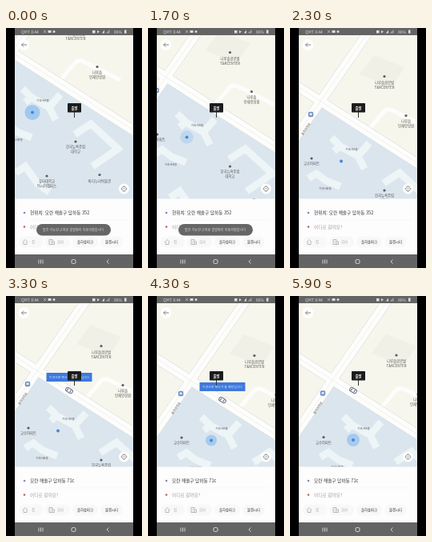
An HTML page for the animation above (6000 ms loop, 170 px wide and 300 px high).

```html
<!DOCTYPE html>
<html lang="ko">
<meta charset="utf-8">
<style>
  html, body { margin: 0; height: 100%; overflow: hidden; background: #000; }
  svg { display: block; width: 170px; height: 300px; }
  text { font-family: "Noto Sans CJK KR", "Noto Sans CJK", sans-serif; font-size: 4.4px; fill: #555; }
  .mid { text-anchor: middle; }
  .status text { font-size: 5px; fill: #ddd; }
  .row { font-size: 5.65px; fill: #333; }
  .line { fill: none; stroke: #ccc; stroke-width: .8; }
</style>
<svg viewBox="0 0 170 300">
  <defs>
    <clipPath id="view"><path d="M11 9H159V214H11z"/></clipPath>
    <path id="roads" d="M-121 -9L329 279M-123 328L177 -106"/>
  </defs>

  <path d="M11 0H159V300H11z" fill="#646464"/>
  <g clip-path="url(#view)">
    <path d="M11 9H159V214H11z" fill="#f6f6ed"/>
    <g id="map">
      <path d="M37 96L320 277V420H-200z" fill="#dbe5ee"/>
      <path d="M88 60L106 36 144 51 128 76z" fill="#f1f0e6"/>
      <path d="M101 127L118 107Q122 102 129 105L175 128" fill="none" stroke="#fdfdfc" stroke-width="5"/>
      <use href="#roads" fill="none" stroke="#dcdedd" stroke-width="12.5"/>
      <use href="#roads" fill="none" stroke="#fdfdfc" stroke-width="11.3"/>
      <use href="#roads" fill="none" stroke="#ecebe3" stroke-width=".7"/>
      <g fill="none" stroke="#eef5f7" stroke-width="9">
        <path d="M53 139L64 150 86 162 100 146M86 162L94 178M64 149L56 156"/>
        <path d="M24 190L34 184 46 193 64 200"/>
        <path d="M118 196L138 183 172 214 140 236"/>
        <path d="M44 244L56 236 72 258 86 268"/>
      </g>
      <g id="places" class="mid"></g>
      <text class="mid" transform="translate(22 129) rotate(-55)" style="font-size:3.8px">솔하과학로</text>
      <g transform="translate(27 110)">
        <rect x="-3.2" y="-3.2" width="6.4" height="6.4" rx="2" fill="#6f8fc4"/>
        <path d="M-1.6 -1.6H1.6V1.2H-1.6z" fill="#dfe8f5"/>
      </g>
      <circle id="halo" cx="65" cy="168.5" fill="#6fb2f0"/>
      <circle cx="65" cy="168.5" r="2" fill="#4a86d8"/>
      <g id="bubble">
        <rect x="50.5" y="96" width="57" height="11" fill="#3f78dc"/>
        <text class="mid" x="79" y="103" style="font-size:3.9px;fill:#e4eeff">이곳으로 택시가 올 예정입니다</text>
      </g>
    </g>
    <g id="car">
      <rect x="-4.5" y="-2.6" width="9" height="5.2" rx="2.2" fill="#f7f9fc" stroke="#56617a" stroke-width=".9"/>
      <path d="M-2.2 -1.7V1.7M1.8 -1.7V1.7" stroke="#56617a"/>
    </g>
    <path d="M85.5 105V112" stroke="#333"/>
    <rect x="77" y="94" width="17" height="11.5" rx=".8" fill="#1c1c1c"/>
    <text class="mid" x="85.5" y="101.6" style="fill:#fff;font-weight:700">출발</text>
    <circle cx="22.5" cy="21" r="7" fill="#fff" opacity=".85"/>
    <path d="M26 21H19.5M22 18.5L19.5 21 22 23.5" class="line" style="stroke:#666"/>
    <circle cx="147.5" cy="201" r="6.5" fill="#fff"/>
    <g class="line" style="stroke:#888">
      <circle cx="147.5" cy="201" r="2.8"/>
      <path d="M147.5 197V198.5M147.5 203.5V205M143.5 201H145M150 201H151.5"/>
    </g>
    <circle cx="147.5" cy="201" r=".8" fill="#888"/>
  </g>

  <path d="M11 213.5H159V283H11z" fill="#fdfdfd"/>
  <circle cx="23" cy="231" r="1.3" fill="#7f88ba"/>
  <text id="address" class="row" x="30" y="233.2"></text>
  <path d="M30 240H152" stroke="#f3f3f3" stroke-width=".6"/>
  <circle cx="23" cy="248.5" r="1.3" fill="#c06078"/>
  <text class="row" x="30" y="250.7" style="fill:#aa9a9d">어디로 갈까요?</text>
  <g id="chips"></g>
  <g class="line" style="stroke:#aaa">
    <path d="M21 267.5L24 264.5 27 267.5M22 267V270.5H26V267"/>
    <path d="M54 270.5V264.5H58V270.5zM58 267H60.5V270.5H58M55.5 266.5H56.5M55.5 268.5H56.5"/>
  </g>
  <g id="toast">
    <rect x="38" y="245" width="93" height="14.5" rx="7.2" fill="#666"/>
    <text class="mid" x="84" y="253.7" style="font-size:4.1px;fill:#ddd">탑승 가능한 근처로 출발점이 이동하였습니다</text>
  </g>

  <g class="status">
    <text x="19" y="6.6">QMT 8:44</text>
    <path d="M47 3L50 6M50 3L47 6" class="line"/>
    <path d="M52.5 3H56.5V6H52.5zM108 3H111.5V6.5H108zM114 3L117 4.7 114 6.5zM120 6.5L123 2.5V6.5zM148 2.5H150.5V6.8H148z" fill="#ddd"/>
    <circle cx="60" cy="4.6" r="1.5" fill="#ddd"/>
    <path d="M126 6.5V5M127.500 6.5V4M129 6.5V2.500" class="line"/>
    <text x="135" y="6.6">86%</text>
  </g>
  <g class="line" style="stroke:#eee">
    <path d="M41 289.5V294.5M43.5 289.5V294.5M46 289.5V294.5M128.5 289.5L126 292 128.5 294.5"/>
    <rect x="82" y="289.5" width="5" height="5" rx="1.5"/>
  </g>
</svg>
<script>
const $ = id => document.getElementById(id);
const LOOP = 6000;

// Labels in map coordinates: x, baseline, pin height above, lines
const places = [
  [119, 71.5, 9, '나루솔글로벌', 'T&amp;KCENTER'],
  [146, 119.5, 8, '나루솔', '인재양성원'],
  [119, 213, 8, '한국뉴욕주립', '대학교'],
  [28, 173, 8, '교수아파트'],
  [78, 155, 0, '기숙사A동'],
  [45, 203.5, 0, '기숙사B동'],
  [83, 256, 8, '유타대학교', '아시아캠퍼스'],
  [149, 255.5, 9, '바다누리박물관'],
];
$('places').innerHTML = places.map(([x, y, pin, ...lines]) =>
  (pin ? `<circle cx="${x}" cy="${y - pin}" r="1.6" fill="#555c64"/>` : '') +
  lines.map((line, i) => `<text x="${x}" y="${y + i * 6}"${pin ? '' : ' style="font-size:3.6px"'}>${line}</text>`).join('')
).join('');

const chips = [[16, 30, 34, '집'], [49, 31, 68, '회사'], [83, 32, 99, '솔하숲파크'], [118, 28, 132, '물결시티']];
$('chips').innerHTML = chips.map(([x, w, cx, label], i) =>
  `<rect x="${x}" y="260.5" width="${w}" height="14" rx="7" fill="#f8f8f8"/>
   <text class="mid" x="${cx}" y="269" style="fill:${i < 2 ? '#aaa' : '#333'}">${label}</text>`).join('');

const panX = [[700, -32], [1400, -27], [2000, -6], [2300, -1], [2700, 0], [3700, 0], [4300, 14], [4700, 16], [5300, 14]];
const panY = [[700, -63], [1400, -51], [2000, -13], [2300, -2], [2700, 0], [3700, 0], [4300, 12], [4700, 14], [5300, 11.5]];
const haloSize = [[0, 9.5], [1400, 10.5], [2000, 6], [2300, 0], [3700, 0], [4300, 7], [5900, 8]];
const haloFade = [[0, .55], [1400, .2], [2000, .35], [4300, .5]];
const toastFade = [[1700, 1], [2000, .5], [2200, 0]];

function track(keys, t) {
  const next = keys.findIndex(key => key[0] > t);
  if (next < 0) return keys.at(-1)[1];
  if (next === 0) return keys[0][1];
  const [t0, a] = keys[next - 1], [t1, b] = keys[next];
  return a + (b - a) * (t - t0) / (t1 - t0);
}

const start = performance.now();
function draw() {
  const t = Math.floor((performance.now() - start) % LOOP / 100) * 100;
  const x = track(panX, t), y = track(panY, t);
  const called = t >= 2700, arrived = t >= 5200;
  $('map').setAttribute('transform', `translate(${x} ${y})`);
  $('halo').setAttribute('r', track(haloSize, t));
  $('halo').setAttribute('opacity', track(haloFade, t));
  $('toast').setAttribute('opacity', track(toastFade, t));
  $('bubble').style.display = called && !arrived ? '' : 'none';
  $('car').style.display = called ? '' : 'none';
  $('car').setAttribute('transform', `translate(${79 + (arrived ? 0 : x)} ${118 + (arrived ? 0 : y)}) rotate(32)`);
  $('address').textContent = called ? '모란 해솔구 담하동 71c' : '현위치: 모란 해솔구 담하동 352';
  requestAnimationFrame(draw);
}
draw();
</script>
</html>
```
